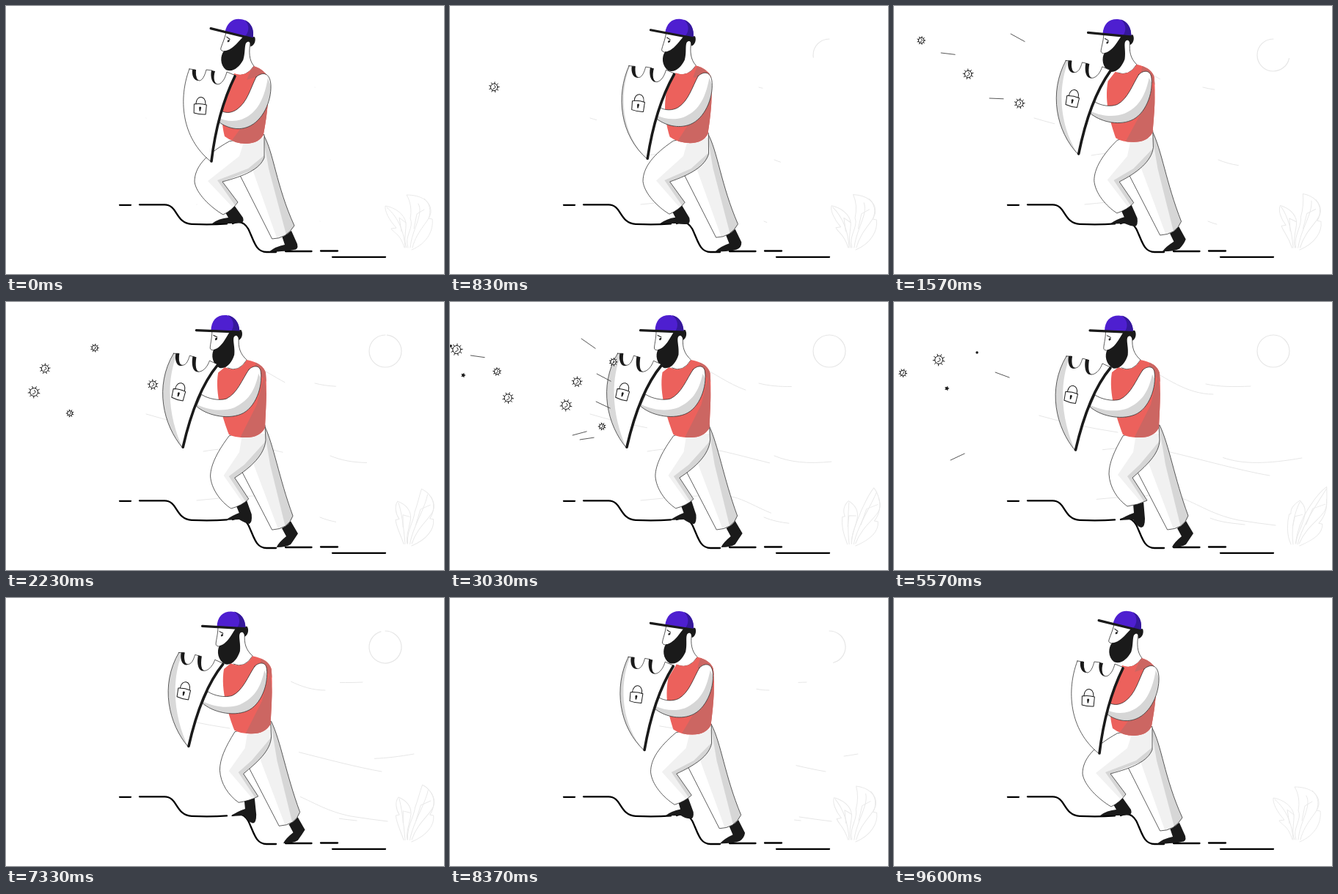
These frames come from a looping animation (597x366 px, 9630 ms). An HTML page with a canvas:

```html
<!DOCTYPE html>
<html lang="en">
<head>
<meta charset="utf-8">
<title>Shield bearer</title>
<style>
html, body { margin: 0; width: 100%; height: 100%; overflow: hidden; background: #fff; }
canvas { display: block; width: 597px; height: 366px; }
</style>
</head>
<body>
<canvas></canvas>
<script>
const LOOP = 9630, W = 597, H = 366;
const INK = '#1a1a1a', PALE = '#f1f1f1', GREY = '#d6d6d6', FAINT = '#e6e6e6';
const canvas = document.querySelector('canvas'), ctx = canvas.getContext('2d');
const dpr = window.devicePixelRatio || 1;
canvas.width = W * dpr;
canvas.height = H * dpr;

const mix = (a, b, k) => a + (b - a) * k;
const ease = (t, from, to) => {
  const k = Math.min(1, Math.max(0, (t - from) / (to - from)));
  return k * k * (3 - 2 * k);
};

// Three poses: upright, braced, and pushed back; then upright again.
let brace, push, relax;
const pose = (a, b, c) => mix(mix(mix(a, b, brace), c, push), a, relax);

// The last pose is either a full path or an [dx, dy] offset from the second.
function morph(a, b, c = [8, 0], blend = pose) {
  const numbers = s => s.match(/-?[\d.]+/g).map(Number);
  const nb = numbers(b), nc = Array.isArray(c) ? nb.map((v, i) => v + c[i % 2]) : numbers(c);
  let i = 0;
  return new Path2D(a.replace(/-?[\d.]+/g, v => blend(+v, nb[i], nc[i++]).toFixed(2)));
}

function fill(path, color) {
  ctx.fillStyle = color;
  ctx.fill(path);
}

function stroke(path, width = 0.7, color = INK) {
  ctx.lineWidth = width;
  ctx.strokeStyle = color;
  ctx.stroke(path);
}

// Fills a shape and paints its shading inside it.
function solid(path, color, shades, outline = true) {
  fill(path, color);
  ctx.save();
  ctx.clip(path);
  for (const [shade, tone] of shades) fill(shade, tone);
  ctx.restore();
  if (outline) stroke(path);
}

const ground = new Path2D(`M155 271.8H170M182 271.3H216C234 271 231 297 253 297.800
  C270 298.6 285 298.5 301 297.3M309 297Q322 291 330 304C338 320 340 336 355 336H368
  M381 335H416.500M429 334.500H452M445 342.800H517`);

const winds = [
  'M340 88C365 98 395 126 435 126',
  'M421 111C440 116 460 116 486 115',
  'M191 153Q240 168 305 178',
  'M269 204C310 197 350 198 372 204C400 210 470 230 512 237',
  'M442 210C470 222 505 222 556 213',
  'M260 271C300 267 350 262 385 266C410 272 430 290 470 298Q495 302 520 305',
  'M428 294C445 301 460 302 478 304'
].map(d => {
  const el = document.createElementNS('http://www.w3.org/2000/svg', 'path');
  el.setAttribute('d', d);
  return { path: new Path2D(d), length: el.getTotalLength() };
});

function drawBackground(windStart, windEnd) {
  if (windStart < 1) for (const { path, length } of winds) {
    ctx.setLineDash([Math.max(0.01, (windEnd - windStart) * length), 2 * length]);
    ctx.lineDashOffset = -windStart * length;
    stroke(path, 1, FAINT);
  }
  ctx.setLineDash([]);

  if (brace > relax) {
    const top = -Math.PI / 2, turn = -2 * Math.PI, sun = new Path2D();
    sun.arc(517, 67, 22, top + turn * relax, top + turn * brace, true);
    stroke(sun, 1.2, FAINT);
  }
  stroke(ground, 2.3, '#000');
}

function drawPlant(bend) {
  const lean = 0.11 * bend;
  ctx.save();
  ctx.transform(1, 0, -lean, 1, lean * 331, 0);
  [
    ['M543 330C537 310 528 310 525 304L532 303C522 292 516 280 517 273C530 275 543 284 545 296C546 305 541 320 546 330',
     'M541 331C533 318 533 300 535 289L537 288C536 282 541 275 549 271C556 278 558 284 556 294C554 308 547 320 548 330'],
    ['M548 330C542 315 557 302 551 290C553 280 552 268 546 258C565 258 579 266 579 280C580 292 560 305 554 330',
     'M547 330C548 312 552 295 560 282C564 276 570 262 584 252C584 262 586 280 583 284C580 295 560 305 552 330'],
    ['M553 333C575 324 583 305 581 291L576 290C580 280 578 270 570 263',
     'M553 333C573 324 583 316 581 304L576 303C584 294 586 280 584 270'],
    ['M544 330C543 310 536 290 519 275', 'M544 331C539 310 541 290 549 273'],
    ['M551 330C553 305 570 285 562 270', 'M550 331C553 308 568 280 583 254'],
    ['M539 308L536 289L545 296', 'M541 306L543 293L553 290'],
    ['M556 304L560 284L570 278', 'M559 304L566 282L583 276']
  ].forEach(([a, b]) => stroke(morph(a, b, [0, 0], (from, to) => mix(from, to, bend)), 1, '#e9e9e9'));
  ctx.restore();
}

function drawLegs() {
  fill(morph('M376 314L389 307L397 325Q399 333 392 333Q385 335 358 336Q368 328 380 326Z',
    'M376 309L388 299L398 316Q394 322 388 331Q382 335 369 335Q371 329 382 320Z', [10, 0]), INK);
  const back = morph('M319 231L320 180L351 176C365 200 368 245 393 300Q382 318 363 318Z',
    'M322 232L320 180L352 168C365 195 372 240 391 292Q385 310 363 311Z', [10, 0]);
  solid(back, '#fff', [
    [morph('M333 215L352 176L400 300L372 325Z', 'M335 215L352 168L400 292L374 318Z', [10, 0]), PALE],
    [morph('M350 176L358 222L384 320L400 305L360 176Z', 'M351 168L360 222L382 312L400 297L360 168Z', [10, 0]), GREY]
  ]);

  fill(morph('M299 282L311 272L323 289Q325 296 320 296Q312 297 305 297L281 297Q290 290 303 289Z',
    'M314 278L328 270L335 290Q336 301 332 303Q326 302 318 297L299 298Q310 291 318 288Z',
    'M326 276L340 272L342 296Q342 308 337 308Q330 306 326 297L308 298Q315 292 327 288Z'), INK);
  const front = morph('M304 185C272 203 257 220 257 240C259 256 279 275 296 285Q308 279 316 268L295 240C325 232 346 223 352 207L352 176Z',
    'M304 183C290 202 279 222 279 238C280 255 293 273 307 282Q322 278 331 269L312 240C334 226 353 208 354 188L353 168Z',
    'M312 183C300 204 293 220 293 235C294 253 304 269 318 279Q333 277 345 271L325 240C342 225 362 208 362 188L361 168Z');
  solid(front, '#fff', [
    [morph('M275 239L318 205L326 180L360 180L360 215L295 240L316 268L309 275Z',
      'M297 237L318 205L322 180L360 180L360 215L312 240L331 269L325 277Z',
      'M305 236L326 205L330 180L368 180L368 215L325 240L345 271L338 275Z'), PALE],
    [morph('M288 238L330 222L352 204L360 190L360 215L295 240L316 268L312 272Z',
      'M304 238L325 222L352 192L358 180L360 215L312 240L331 269L327 273Z',
      'M318 238L335 222L360 192L366 180L368 215L325 240L345 271L341 273Z'), GREY]
  ]);
}

function drawTorso() {
  const neck = morph('M305 70L312 94Q327 98 338 82C331 74 331 62 333 50L318 45Z',
    'M292 70L302 90Q317 97 328 79C319 71 316 62 317 50L302 45Z');
  fill(neck, '#fff');
  stroke(morph('M312 94Q327 98 338 82C331 74 331 62 333 50', 'M302 90Q317 97 328 79C319 71 316 62 317 50'));
  const torso = morph('M311 92Q327 98 338 82Q352 87 356 96C360 115 356 150 351 175Q346 187 328 188Q311 188 298 178C295 165 292 150 298 120Z',
    'M298 89Q317 98 328 79Q350 83 354 97C356 120 354 150 353 172Q345 186 325 185Q311 185 304 181C296 160 284 125 289 96Z');
  solid(torso, '#ec615c', [
    [morph('M358 132L322 164L303 190L340 192L360 180Z', 'M352 100L342 140L318 188L345 190L360 170Z'), '#cc6662'],
    [morph('M336 82L360 86L360 100L340 97L328 101Z', 'M340 80L358 82L360 115L347 100L340 88Z'), '#cc6662']
  ], false);

  const arm = morph('M341 97C333 113 329 131 315 141C308 146 300 147 293 143L288 157C300 166 315 171 330 165C350 157 362 130 361 108C360 91 350 89 341 97Z',
    'M331 92C322 105 315 125 300 132C290 135 275 132 266 126L259 142C272 154 300 161 320 153C340 145 350 115 347 95C346 86 337 86 331 92Z', [8, 1]);
  solid(arm, '#fff', [
    [morph('M357 98C351 133 339 148 321 155C311 158 300 158 288 152L286 172L335 175L368 130Z',
      'M344 98C338 124 329 135 311 144C297 149 279 149 260 140L255 160L330 165L356 120Z', [8, 1]), GREY]
  ]);
}

function drawHead() {
  ctx.save();
  ctx.translate(pose(318, 299, 307), pose(40, 40, 40.5));
  ctx.rotate(pose(0.205, 0, 0.01));
  ctx.translate(-299, -40);
  fill(new Path2D('M280.500 40C280.500 50 278 58 278 63Q278 66 284 66L298 72L314 56L314 40Z'), '#fff');
  stroke(new Path2D('M280.500 40C280.500 50 278 58 278 63Q278 66 284 66'));
  fill(new Path2D(`M305 40L299 50C295 57 289 64 283 65C279 72 281 85 291 90C301 92 308 82 311 72
    C312 62 309 54 310 49C311 45 316 44 317 52C322 50 323 42 320 38Z`), INK);
  stroke(new Path2D('M282.500 45.500L287.500 48'), 1);
  fill(new Path2D('M284.500 51Q285 48.500 287.500 49Q288.500 51 285.500 52.500Z'), INK);
  fill(new Path2D('M279 40C279 25 287 18 298 18C310 18 318 27 318 41Z'), '#4e1fd0');
  fill(new Path2D('M302 18C311 24 311 34 306.500 40L318 41C318 28 311 20 302 18Z'), '#35189a');
  stroke(new Path2D('M259 38.700L319 41'), 3.2);
  ctx.restore();
}

function drawShield() {
  const shift = [7, 4];
  const shield = morph('M250 86L258 87C258 96 260 102 264 102C268 101 271 95 273 87L281 88C281 98 284 107 289 107C295 106 299 98 301 90L313 95Q288 145 280 213C238 180 235 125 250 86Z',
    'M228 70L235 70C234 80 236 87 241 86C246 85 248 79 250 73L257 75C256 88 258 95 263 95C270 94 275 86 277 80L288 85Q258 122 240 199C214 168 201 115 228 70Z', shift);
  solid(shield, '#fff', [
    [morph('M280 213C238 180 235 125 250 86L250 86C235 125 238 180 280 213Z',
      'M240 199C214 168 201 115 228 70L233 70C214 118 226 168 240 199Z', shift), '#d9d9d9']
  ]);
  fill(morph('M254 87L259 87C258 96 260 102 264 102C256 103 253 95 254 87Z',
    'M231 70L236 70C234 80 236 87 241 86C233 90 229 80 231 70Z', shift), INK);
  fill(morph('M280 88L285 89C282 98 284 107 289 107C281 108 278 97 280 88Z',
    'M254 74L259 75C257 88 259 95 263 95C254 97 252 85 254 74Z', shift), INK);
  stroke(morph('M312 96Q288 145 280 212', 'M288 86Q258 122 240.500 198', shift), 3.6);

  ctx.save();
  ctx.translate(pose(264.5, 234.5, 241), pose(140.5, 126, 130));
  ctx.rotate(pose(0.06, 0.24, 0.2));
  stroke(new Path2D('M-8.500 -6Q0 -8 8.500 -6L8 7Q0 8 -8 6ZM-6 -7C-6 -19 7 -19 7 -7'), 1);
  fill(new Path2D('M-1.500 -2Q0 -4 1.500 -2L0.700 3L-0.700 3Z'), INK);
  ctx.restore();
}

// Flying things: [time, x, y, slope, radius, speed in px per ms]
const SPEED = 0.15;
const germs = [
  [1570, 37, 47, 0.188, 5.5, 0.127], [1570, 101, 93, 0.2, 7], [1570, 171, 133, 0.2, 7],
  [3030, 9, 65, 0.113, 8], [3030, 64, 95, 0.2, 5.5, 0.138], [3030, 79, 131, 0.204, 7.5],
  [3030, 158, 141, 0.15, 8], [3030, 173, 109, 0.15, 7], [3030, 207, 170, 0.15, 5],
  [3970, 7, 98, 0.15, 7], [3970, 47, 67, 0.15, 6], [3970, 118, 157, 0.1, 5.5],
  [5570, 12, 97, 0.15, 5.5], [5570, 61, 79, 0.15, 8]
];
const specks = [
  [3030, 1, 60, 0.218, 1.8, 0.156], [3030, 18, 100, 0.213, 3.5],
  [5570, 113, 69, 0.2, 1.8], [5570, 72, 118, 0.2, 3.5]
];
// Dashes: [time, x, y, slope]
const DASH_LIFE = 600;
const dashes = [
  [1570, 64, 64, 0.12], [1570, 159, 38, 0.55], [1570, 130, 126, 0.04],
  [3030, 28, 73, 0.14], [3030, 179, 50, 0.7], [3030, 200, 98, 0.53],
  [3030, 199, 136, 0.47], [3030, 167, 182, -0.27], [3030, 177, 188, -0.15],
  [3970, 68, 2, 0.33], [3970, 125, 126, 0.04], [3970, 188, 117, 0.5],
  [3970, 169, 86, 0.37], [3970, 207, 171, -0.12], [3970, 197, 185, -0.06],
  [5570, 138, 96, 0.37], [5570, 77, 216, -0.47]
];

function drawGerm(r, spin) {
  const body = new Path2D(), core = r * 0.68;
  body.arc(0, 0, core, 0, 7);
  for (let i = 0; i < 9; i++) {
    const a = spin + i * Math.PI * 2 / 9, c = Math.cos(a), s = Math.sin(a);
    body.moveTo(c * core, s * core);
    body.lineTo(c * r, s * r);
  }
  body.moveTo(-core * 0.3, core * 0.5);
  body.quadraticCurveTo(core * 0.8, core * 0.2, core * 0.1, -core * 0.5);
  fill(body, '#fff');
  stroke(body, 1);
}

function drawSpeck(r) {
  const shape = new Path2D();
  if (r < 2) shape.arc(0, 0, r, 0, 7);
  else for (let i = 0; i < 10; i++) {
    const a = i * Math.PI / 5, d = i % 2 ? r * 0.5 : r;
    shape.lineTo(Math.cos(a) * d, Math.sin(a) * d);
  }
  fill(shape, INK);
}

function drawFlying(t) {
  const fly = ([time, x, y, slope, r, speed = SPEED], draw) => {
    const dx = (t - time) * speed;
    if (x + dx < -10 || x + dx > 226) return;
    ctx.save();
    ctx.translate(x + dx, y + dx * slope);
    draw(r, x);
    ctx.restore();
  };
  for (const [time, x, y, slope] of dashes) {
    const dx = (t - time) * SPEED, left = x + dx, right = Math.min(left + 19, 228);
    if (Math.abs(t - time) > DASH_LIFE || right <= left) continue;
    const line = new Path2D();
    line.moveTo(left, y + dx * slope);
    line.lineTo(right, y + (right - x) * slope);
    stroke(line, 0.9, '#444');
  }
  germs.forEach(g => fly(g, drawGerm));
  specks.forEach(s => fly(s, drawSpeck));
}

function frame() {
  const t = performance.now() % LOOP;
  const windStart = ease(t, 4850, 9600), windEnd = ease(t, 0, 4850);
  brace = ease(t, 0, 2420);
  push = ease(t, 2700, 4850);
  relax = ease(t, 7000, 9600);
  ctx.setTransform(dpr, 0, 0, dpr, 0, 0);
  ctx.clearRect(0, 0, W, H);
  ctx.lineCap = ctx.lineJoin = 'round';
  drawBackground(windStart, windEnd);
  drawPlant(windEnd - windStart);
  drawLegs();
  drawTorso();
  drawHead();
  drawShield();
  drawFlying(t);
  requestAnimationFrame(frame);
}
frame();
</script>
</body>
</html>
```
